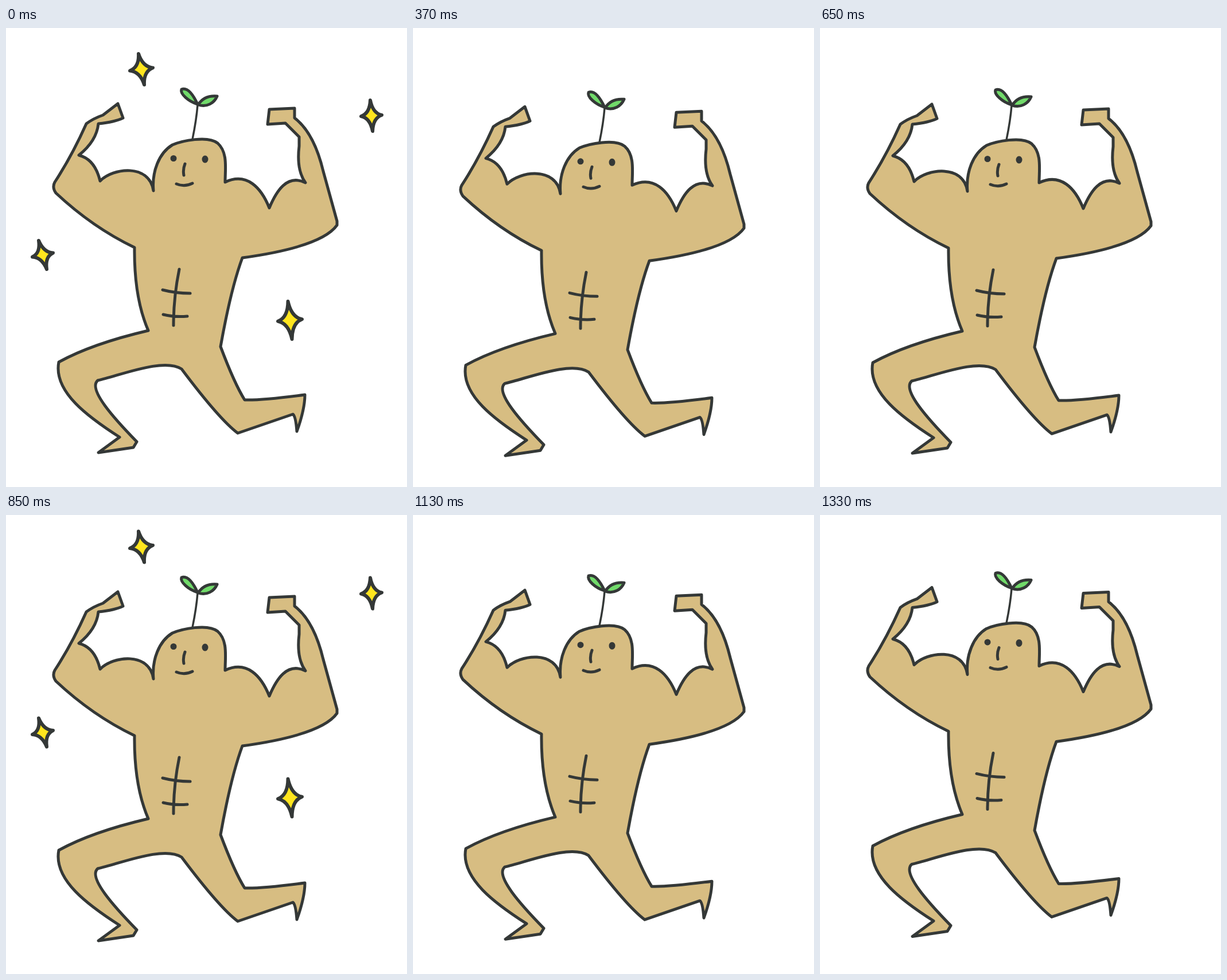
Animation of 699 by 801 pixels, one loop 1580 ms. Source, as an HTML page:

```html
<!DOCTYPE html>
<html lang="en">
<head>
<meta charset="utf-8">
<title>Flexing sprout</title>
<style>
  html, body { margin: 0; width: 100%; height: 100%; overflow: hidden; background: #fff; }
  svg { display: block; width: 699px; height: 801px; }
  .ink { fill: none; stroke: #343837; stroke-width: 5; stroke-linecap: round; stroke-linejoin: round; }
  .skin { fill: #d7bd82; }
  .leaf { fill: #71da6a; }
  .star { fill: #ffe51e; stroke-width: 6; }
  .stem { stroke-width: 3.5; }
  .dot { fill: #343837; }
</style>
</head>
<body>
<svg viewBox="0 0 699 801">
  <g id="stars"></g>
  <g id="man" class="ink">
    <path class="skin" d="M195 132L204 157Q190 164 161 167Q158 197 127 222Q155 229 164 267
      C186 244 250 236 257 284C254 250 267 218 290 204C306 197 352 187 369 201
      C387 217 382 245 382 269C420 251 445 279 459 314C471 285 490 254 522 270
      Q506 248 511 206V190L487 166L456 168L459 142L503 140V157Q537 183 553 250
      L577 337V344Q550 382 412 401Q392 455 374 556Q398 620 416 649Q445 650 521 640
      Q521 665 507 704Q505 677 500 674L404 707Q372 683 306 595C275 575 200 606 160 615
      C142 630 188 681 228 722L222 732L161 741L198 714C145 680 82 635 92 583
      Q150 551 248 528Q223 470 224 383Q151 348 87 288Q80 278 85 269Q115 223 140 167
      Q152 158 169 152Z"/>
    <path class="stem" d="M325 194Q332 160 334 134"/>
    <path class="leaf" d="M334 133C318 128 303 115 306 107C316 103 326 116 334 133Z"/>
    <path class="leaf" d="M335 134C343 121 356 118 368 119C363 131 350 139 335 134Z"/>
    <circle class="dot" cx="292" cy="227.500" r="3"/>
    <ellipse class="dot" cx="347" cy="229" rx="3" ry="4"/>
    <path d="M312 237Q308 247 310 257M297 272Q311 278 325 271"/>
    <path d="M302 421Q292 470 292 519M273 457Q296 463 321 463M274 500Q294 505 316 503"/>
  </g>
</svg>
<script>
const LOOP = 1580, STEP = 40, PHASE = 10, REST = 1330;

// turning points of the body's bob: [time, offset]
const turns = [[0, 0], [400, 5.4], [690, 0.8], [930, 2.4], [1400, -6]];

// [on, off, vertical offset] of the sparkles
const flashes = [[0, 130, 0], [810, 970, -16.5], [1250, REST, -13]];

// [x, y, half width, half height, tilt]
const sparkles = [[236, 72, 20, 27, 5], [637, 153, 18, 27, 2], [64, 396, 18, 25, 7], [495, 510, 21, 33, 3.5]];

const man = document.getElementById("man");
const stars = document.getElementById("stars");

function starPath([x, y, w, h, tilt]) {
  const tips = [[-tilt, -h], [w, -tilt / 2], [tilt, h], [-w, tilt / 2]];
  const at = ([dx, dy]) => `${x + dx} ${y + dy}`;
  return tips.reduce((d, p, i) => {
    const next = tips[(i + 1) % 4];
    const bend = p.map((v, k) => (v + next[k]) * 0.15);
    return `${d}Q${at(bend)} ${at(next)}`;
  }, `M${at(tips[0])}`) + "Z";
}

for (const s of sparkles) {
  const path = document.createElementNS("http://www.w3.org/2000/svg", "path");
  path.setAttribute("class", "ink star");
  path.setAttribute("d", starPath(s));
  stars.append(path);
}

function bob(t) {
  const i = turns.findIndex(([end]) => end > t);
  const [t0, a] = turns[i - 1], [t1, b] = turns[i];
  return a + (b - a) * (1 - Math.cos(Math.PI * (t - t0) / (t1 - t0))) / 2;
}

const shift = (node, y) => node.setAttribute("transform", `translate(0 ${y})`);

function draw(now) {
  const t = now % LOOP;
  const held = t < 130 ? 0 : PHASE + Math.floor((t - PHASE) / STEP) * STEP;
  shift(man, bob(Math.min(held, REST)));
  const flash = flashes.find(([on, off]) => t >= on && t < off);
  stars.setAttribute("visibility", flash ? "visible" : "hidden");
  if (flash) shift(stars, flash[2]);
}

const start = performance.now();
function tick() {
  draw(performance.now() - start);
  requestAnimationFrame(tick);
}
tick();
</script>
</body>
</html>
```
